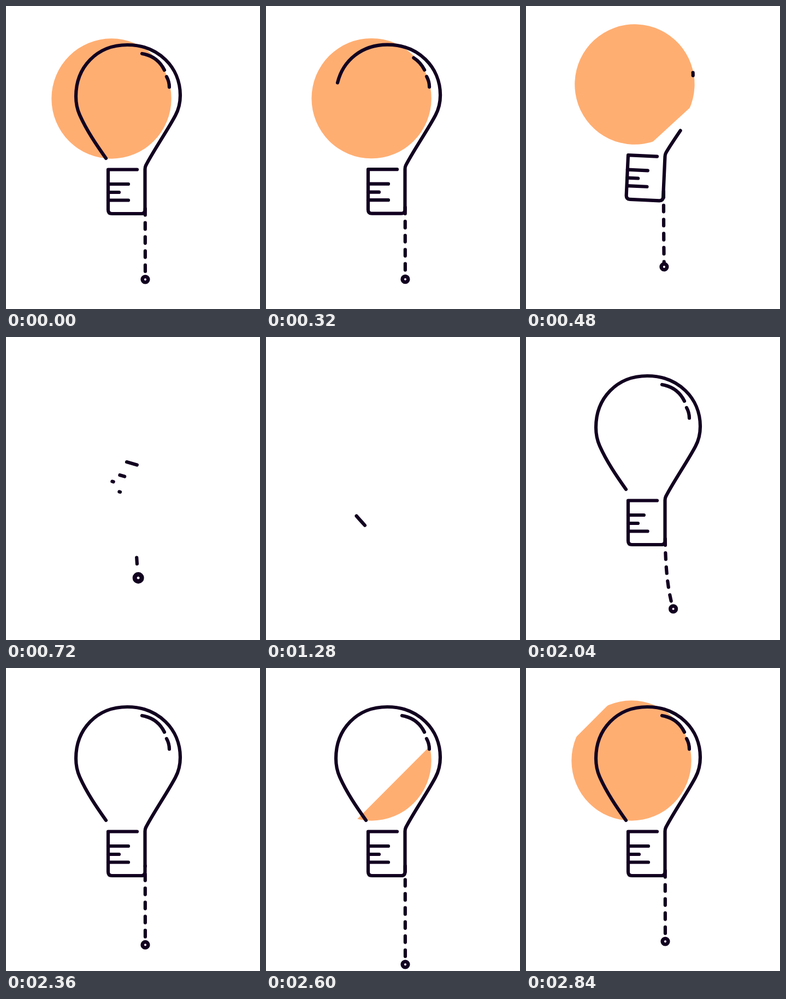
Animation of 465x553 px, one loop 2.88 s. Source, as an HTML page:

```html
<!DOCTYPE html>
<html lang="en">
<head>
<meta charset="utf-8">
<title>Light bulb</title>
<style>
  html, body { margin: 0; width: 100%; height: 100%; overflow: hidden; background: #fff; }
  svg { display: block; width: 100%; height: 100%; }
  .line { fill: none; stroke: #120020; stroke-width: 6.2; stroke-linecap: round; stroke-linejoin: round; }
  #ring { fill: #fff; stroke-width: 6.6; }
</style>
</head>
<body>
<svg viewBox="0 0 465 553">
  <defs>
    <clipPath id="wipe"><rect id="wipeBox" y="-200" height="400" transform="translate(193 169) rotate(45)"/></clipPath>
  </defs>
  <g id="lamp">
    <circle id="glow" cx="193" cy="169" r="109.7" fill="#ffae72" clip-path="url(#wipe)"/>
    <path id="bulb" class="line" d="M183 278C166 254 148 228 135 199C130 188 128 177 128 165C128 112 166 71 222 71C279 71 319 112 319 163C319 176 316 189 310 200C295 228 270 264 256 291Q254.5 294 254.5 298V372Q254.5 379 247.5 379H194Q187 379 187 372V298.5H240"/>
    <path id="shine1" class="line" d="M249 87C268 90 282 101 290 117"/>
    <path id="shine2" class="line" d="M294 129Q299 138 299 148"/>
    <path id="tick0" class="line" d="M187 325H224"/>
    <path id="tick1" class="line" d="M187 340H207"/>
    <path id="tick2" class="line" d="M187 354.5H224"/>
  </g>
  <path id="cord" class="line"/>
  <circle id="ring" class="line" r="5.3"/>
</svg>
<script>
const LOOP = 2880, STEP = 40, TURN = 1040;   // the lamp leaves before TURN, returns after it
const PIVOT = { x: 240, y: 298 }, REST = { x: 255, y: 499 };
const TRAVEL = 65, TILT = 18, REACH = 112, PULL = 42, SWAY = 33;
const DASH = 11.5, PITCH = 25.7;

const $ = id => document.getElementById(id);
const set = (el, attrs) => { for (const k in attrs) el.setAttribute(k, attrs[k]); };
const show = (el, on) => el.setAttribute('visibility', on ? 'visible' : 'hidden');
const progress = (t, start, span) => Math.min(1, Math.max(0, (t - start) / span));

function ease(t, start, span, power = 3) {
  const u = progress(t, start, span), k = 2 ** (power - 1);
  return u < 0.5 ? k * u ** power : 1 - k * (1 - u) ** power;
}

// Swells before it shrinks from 1 to 0
const swell = u => 1 - u * u * (3.8 * u - 2.8);

function trim(el, from, to) {
  const len = to - from;
  show(el, len > 0.3);
  set(el, { 'stroke-dasharray': `${Math.max(len, 0.1)} ${el.getTotalLength() + 20}`, 'stroke-dashoffset': -from });
}

// Draws paths as one stroke: p grows it from its start, or erases it from its start
function stroke(paths, p, leaving) {
  const lengths = paths.map(el => el.getTotalLength());
  const head = p * lengths.reduce((a, b) => a + b);
  let offset = 0;
  paths.forEach((el, i) => {
    const cut = Math.min(lengths[i], Math.max(0, head - offset));
    leaving ? trim(el, cut, lengths[i]) : trim(el, 0, cut);
    offset += lengths[i];
  });
}

function rotated(x, y, degrees) {
  const a = degrees * Math.PI / 180, dx = x - PIVOT.x, dy = y - PIVOT.y;
  return {
    x: PIVOT.x + dx * Math.cos(a) - dy * Math.sin(a),
    y: PIVOT.y + dx * Math.sin(a) + dy * Math.cos(a)
  };
}

const guide = document.createElementNS('http://www.w3.org/2000/svg', 'path');

// Dashes are spaced from the ring upwards and clipped to near..far
function drawCord(top, ring, shift, near, far) {
  const bendY = top.y + 0.65 * (ring.y - top.y);
  set(guide, { d: `M${ring.x} ${ring.y}Q${top.x} ${bendY} ${top.x} ${top.y}` });
  const end = Math.min(far, guide.getTotalLength());
  const at = s => { const p = guide.getPointAtLength(s); return `${p.x.toFixed(2)} ${p.y.toFixed(2)}`; };
  let d = '';
  for (let mid = shift - PITCH; mid < end + DASH; mid += PITCH) {
    const a = Math.max(mid - DASH / 2, near), b = Math.min(mid + DASH / 2, end);
    if (b - a > 0.2) d += `M${at(a)}L${at(b)}`;
  }
  set($('cord'), { d });
}

function draw(t) {
  const leaving = t < TURN;

  const dy = leaving ? -TRAVEL * ease(t, 270, 465) : TRAVEL * (1 - ease(t, 1145, 465));
  const tilt = leaving ? TILT * ease(t, 265, 650) : -TILT * (1 - ease(t, 929, 650));
  set($('lamp'), { transform: `translate(0 ${dy}) rotate(${tilt} ${PIVOT.x} ${PIVOT.y})` });

  const edge = REACH * (1 - 2 * (leaving ? ease(t, 396, 351) : ease(t, 2432, 480, 2)));
  show($('glow'), leaving ? edge > -111 : edge < 111);
  set($('wipeBox'), leaving ? { x: -200, width: 200 + edge } : { x: edge, width: 200 - edge });

  stroke([$('bulb')], ease(t, leaving ? 14 : 1117, 863), leaving);
  stroke([$('shine1'), $('shine2')], ease(t, leaving ? 100 : 1480, 515), leaving);
  for (let i = 0; i < 3; i++)
    stroke([$('tick' + i)], ease(t, (leaving ? 478 : 1792) - 34 * i, 400), leaving);

  const sway = SWAY * (1 - ease(t, 1832, 400));
  const pull = PULL * (ease(t, 2240, 360) - ease(t, 2600, 224));
  const ring = leaving
    ? { x: REST.x - 0.8 * tilt, y: REST.y + dy + 0.35 * tilt }
    : { x: REST.x + sway, y: REST.y - sway * sway / 75 + pull };
  const size = swell(leaving ? progress(t, 520, 407) : 1 - progress(t, 1520, 300));
  show($('ring'), size > 0.02);
  set($('ring'), { transform: `translate(${ring.x} ${ring.y}) scale(${size})` });

  const top = rotated(254.8, 361, tilt);
  top.y += dy;
  if (leaving) drawCord(top, ring, 20.5 + 11 * ease(t, 100, 600), 18 * ease(t, 560, 150), 150 * (1 - ease(t, 480, 403)));
  else drawCord(top, ring, 20.5, 140 * (1 - ease(t, 1500, 300)), Infinity);
}

const start = performance.now();
function tick() {
  const t = (performance.now() - start) % LOOP;
  draw(Math.floor(t / STEP) * STEP);
  requestAnimationFrame(tick);
}
tick();
</script>
</body>
</html>
```
